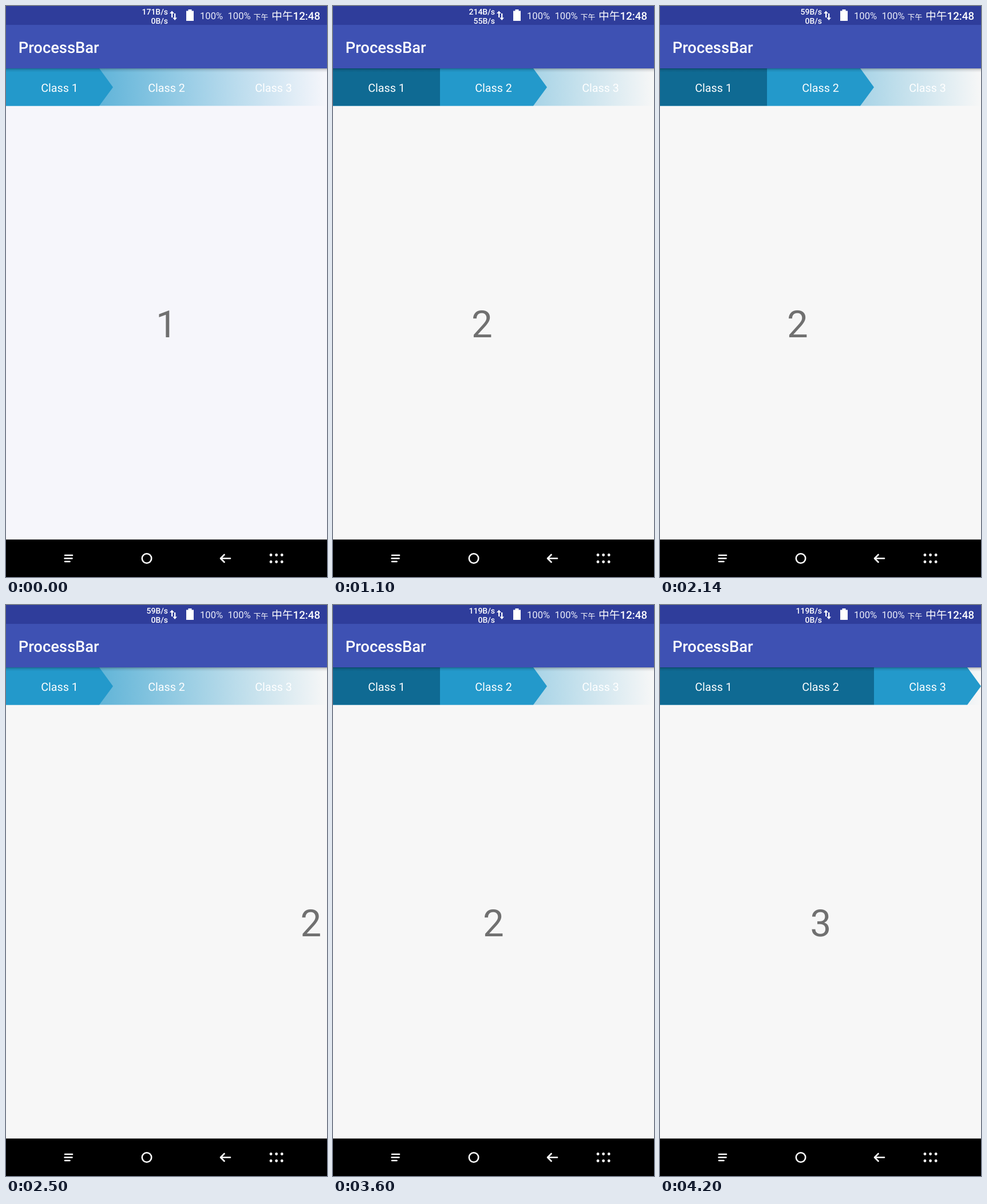
An HTML page that plays this animation: 561 by 998 pixels, repeating every 4.22 s.

```html
<!DOCTYPE html>
<html lang="en">
<head>
<meta charset="utf-8">
<title>ProcessBar</title>
<style>
  html, body { margin: 0; width: 100%; height: 100%; overflow: hidden; background: #f7f7f7; }
  svg { display: block; width: 561px; height: 998px; }
  text { font-family: Roboto, "Noto Sans CJK SC", "Noto Sans CJK JP", sans-serif; fill: #fff; text-rendering: geometricPrecision; }
  .mid { text-anchor: middle; }
  .label { font-size: 19.7px; }
  .digit { font-size: 65.4px; fill: #707070; }
  .rate { font-size: 14px; font-weight: 500; text-anchor: end; }
  .level { font-size: 16.6px; fill: #eceefa; }
  .title { font-size: 27.3px; font-weight: 500; }
  .line { fill: none; stroke: #fff; stroke-width: 2.6; stroke-linecap: round; stroke-linejoin: round; }
</style>
</head>
<body>
<svg viewBox="0 0 561 998">
  <defs>
    <linearGradient id="fade">
      <stop stop-color="#2399cb"/>
      <stop offset="1" stop-color="#2399cb" stop-opacity="0"/>
    </linearGradient>
    <linearGradient id="shade" x2="0" y2="1">
      <stop stop-opacity=".3"/>
      <stop offset=".4" stop-opacity=".1"/>
      <stop offset="1" stop-opacity="0"/>
    </linearGradient>
  </defs>

  <rect id="page" width="561" height="998" fill="#f7f7f7"/>
  <g id="pager"></g>

  <rect y="109" width="561" height="65.5" fill="url(#fade)"/>
  <rect id="done" y="109" height="65.5" fill="#0f6a93"/>
  <path id="arrow" d="M0 109H163L187 142L163 174.5H0Z" fill="#2399cb"/>
  <g id="labels"></g>

  <rect width="561" height="33" fill="#2f3d9b"/>
  <rect y="33" width="561" height="76" fill="#3e51b3"/>
  <rect y="109" width="561" height="7" fill="url(#shade)"/>
  <text class="title" x="21.8" y="81.5">ProcessBar</text>

  <text class="rate" id="down" x="283" y="15"></text>
  <text class="rate" id="up" x="283" y="31"></text>
  <path d="M289 20V13H286L290 8.500L294 13H291.300V20ZM294 13H296.300V20.500H299L295.100 25L291.300 20.500H294Z" fill="#fff"/>
  <path d="M315 8.500H318.500V6H324.500V8.500H328V26H315Z" fill="#fff"/>
  <text class="level" x="339" y="23">100%</text>
  <text class="level" x="387.500" y="23">100%</text>
  <text x="432.500" y="23.500" font-size="12.900">下午</text>
  <text x="464" y="24" font-size="18.800">中午</text>
  <text x="501.500" y="24" font-size="18.800" font-weight="500">12:48</text>

  <rect y="932.5" width="561" height="65.5"/>
  <path class="line" d="M103 960H116M102.500 965.500H115.500M103 971H111.500"/>
  <circle class="line" cx="246" cy="965.5" r="8.2"/>
  <path class="line" d="M392 965.500H375.500M381.500 959L375 965.500L381.500 972"/>
  <g id="dots" fill="#fff"></g>
</svg>
<script>
const LOOP = 4220, STEP = 20, WIDTH = 561, TAB = 187;
const $ = id => document.getElementById(id);

// drag start, release, settle time, from page, to page, dragged distance
const swipes = [
  [440, 620, 600, 0, 1, 265],
  [1089, 1190, 600, 1, 2, 265],
  [1680, 1942, 600, 2, 1, 265],
  [2420, 2490, 440, 1, 0, 215],
  [2928, 3050, 600, 0, 1, 265],
  [3600, 3770, 600, 1, 2, 271]
];
const rates = [
  [0, "171B/s", "0B/s"],
  [100, "214B/s", "55B/s"],
  [1240, "59B/s", "0B/s"],
  [3300, "119B/s", "0B/s"]
];

function add(parent, name, attrs, text = "") {
  const el = document.createElementNS("http://www.w3.org/2000/svg", name);
  for (const key in attrs) el.setAttribute(key, attrs[key]);
  el.textContent = text;
  $(parent).append(el);
}

for (let i = 0; i < 3; i++) {
  add("pager", "text", { class: "mid digit", x: 280.5 + i * WIDTH, y: 579 }, i + 1);
  add("labels", "text", { class: "mid label", x: 93.5 + i * TAB, y: 149.5 }, "Class " + (i + 1));
  for (const cy of [959.5, 971.5]) add("dots", "circle", { cx: 463 + i * 9.6, cy, r: 2.4 });
}

const current = (list, t) => list.filter(item => item[0] <= t).pop();

function pagerAt(t) {
  const swipe = current(swipes, t);
  if (!swipe) return { scroll: 0, tab: 0 };
  const [start, release, settle, from, to, reach] = swipe;
  let moved;
  if (t < release) {
    moved = reach * ((t - start) / (release - start)) ** 1.17;
  } else {
    const left = Math.max(0, 1 - (t - release) / settle);
    moved = WIDTH - (WIDTH - reach) * left ** 5;
  }
  return { scroll: from * WIDTH + (to - from) * moved, tab: t < release ? from : to };
}

function draw(t) {
  const { scroll, tab } = pagerAt(t);
  const [, down, up] = current(rates, t);
  $("pager").setAttribute("transform", `translate(${-Math.round(scroll * 2) / 2})`);
  $("done").setAttribute("width", tab * TAB);
  $("arrow").setAttribute("transform", `translate(${tab * TAB})`);
  $("page").setAttribute("fill", t < 360 ? "#f6f6fb" : "#f7f7f7");
  $("down").textContent = down;
  $("up").textContent = up;
}

const begin = performance.now();
function tick() {
  const t = (performance.now() - begin) % LOOP;
  draw(Math.floor(t / STEP) * STEP);
  requestAnimationFrame(tick);
}
tick();
</script>
</body>
</html>
```
